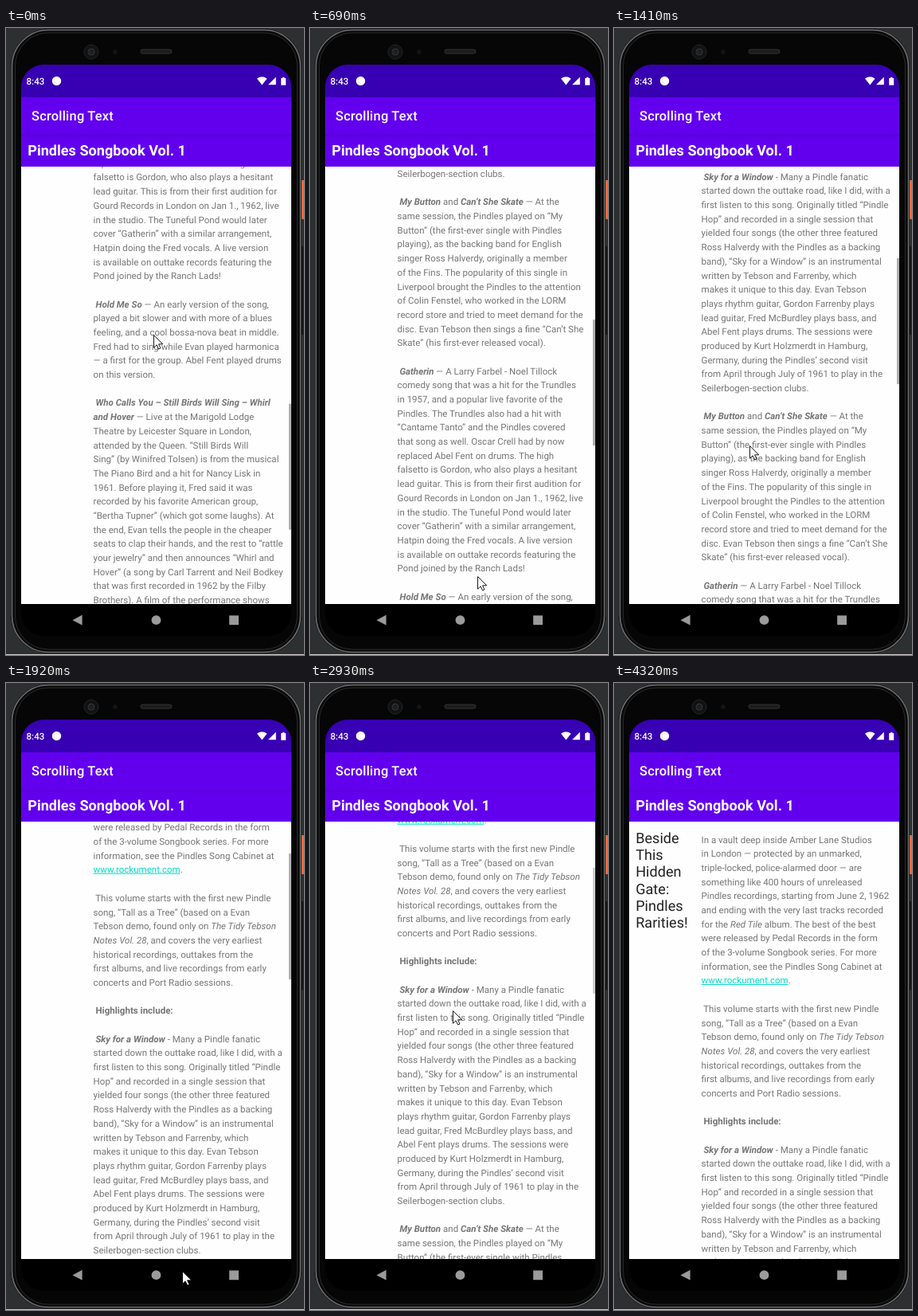
Write an HTML page that moves like this. It is 374 by 787 pixels and loops after 4.6 s.

```html
<!DOCTYPE html>
<html lang="en">
<head>
<meta charset="utf-8">
<title>Scrolling Text</title>
<style>
html, body { margin: 0; width: 100%; height: 100%; overflow: hidden; background: #2e2f31; }
body { position: relative; font-family: Roboto, sans-serif; text-rendering: geometricPrecision; }
svg { position: absolute; left: 0; top: 0; font-family: Roboto, sans-serif; }
#view { position: absolute; left: 19px; top: 174px; width: 339px; height: 549px; overflow: hidden; background: #fefefe; }
#doc { position: absolute; left: 0; top: 0; white-space: pre; }
#head { position: absolute; left: 8.2px; top: 10.5px; font-size: 18.13px; line-height: 21.34px; color: #212121; }
#text { position: absolute; left: 90.6px; top: 14.6px; font-size: 11.54px; line-height: 17.68px; color: #757575; }
#text u { color: #03dac5; }
#thumb { position: absolute; right: 0; top: 0; width: 3.3px; height: 158px; background: #aeaeae; }
</style>
</head>
<body>
<svg width="374" height="787">
  <defs>
    <linearGradient id="shade" x2="0" y2="1">
      <stop stop-color="#000" stop-opacity=".12"/><stop offset="1" stop-color="#000" stop-opacity="0"/>
    </linearGradient>
    <clipPath id="screen"><rect x="19" y="46" width="339" height="717" rx="28"/></clipPath>
  </defs>
  <!-- phone body -->
  <rect x="369" y="191" width="5" height="49" fill="#ee6a3c"/>
  <rect x="369" y="274" width="4" height="111" fill="#151515"/>
  <rect x="6" y="1" width="365" height="784" rx="48" fill="#0a0a0a"/>
  <rect x="7.5" y="2.5" width="362" height="781" rx="46" fill="none" stroke="#6f7072" stroke-width="1.6"/>
  <rect x="11.5" y="6" width="354" height="774" rx="42" fill="#060606" stroke="#2c2c2d"/>
  <rect y="786" width="374" height="1" fill="#d5d0d0"/>
  <circle cx="107" cy="30" r="9" fill="#111213" stroke="#232425"/>
  <circle cx="107" cy="30" r="4" fill="#1d1f22" stroke="#34363a"/>
  <circle cx="137" cy="30" r="3" fill="#141414"/>
  <rect x="169" y="27" width="39" height="5" rx="2.5" fill="#1c1c1d" stroke="#333"/>
  <!-- bars -->
  <g clip-path="url(#screen)">
    <rect x="19" y="46" width="339" height="717"/>
    <rect x="19" y="46" width="339" height="41" fill="#3700b3"/>
    <rect x="19" y="87" width="339" height="87" fill="#6200ee"/>
    <rect x="19" y="133.5" width="339" height="4" fill="url(#shade)"/>
  </g>
  <g fill="#fff">
    <text x="25.5" y="71" font-size="11.6" font-weight="500">8:43</text>
    <circle cx="63.5" cy="66.5" r="5.7"/>
    <path d="M321.3 71.5L315 63.6Q321.3 58.8 327.6 63.6ZM329 71.3L338.8 61.5V71.3ZM345.2 63H347V61.7H349.5V63H351.2V71.8H345.2Z"/>
    <text x="32" y="116.2" font-size="16.48" font-weight="500" letter-spacing=".206">Scrolling Text</text>
    <text x="27.2" y="160.4" font-size="18.13" font-weight="700">Pindles Songbook Vol. 1</text>
  </g>
  <g fill="#9b9b9b">
    <path d="M83.5 743.2L95.6 736.8V749.6Z"/>
    <circle cx="188.5" cy="743.2" r="5.9"/>
    <rect x="280.2" y="737.4" width="11.8" height="11.8"/>
  </g>
</svg>

<div id="view">
<div id="doc"><div id="head">Beside
This
Hidden
Gate:
Pindles
Rarities!</div><div id="text">In a vault deep inside Amber Lane Studios
in London — protected by an unmarked,
triple-locked, police-alarmed door — are
something like 400 hours of unreleased
Pindles recordings, starting from June 2, 1962
and ending with the very last tracks recorded
for the <i>Red Tile</i> album. The best of the best
were released by Pedal Records in the form
of the 3-volume Songbook series. For more
information, see the Pindles Song Cabinet at
<u>www.rockument.com</u>.

 This volume starts with the first new Pindle
song, “Tall as a Tree” (based on a Evan
Tebson demo, found only on <i>The Tidy Tebson
Notes Vol. 28</i>, and covers the very earliest
historical recordings, outtakes from the
first albums, and live recordings from early
concerts and Port Radio sessions.

 <b>Highlights include:</b>

 <b><i>Sky for a Window</i></b> - Many a Pindle fanatic
started down the outtake road, like I did, with a
first listen to this song. Originally titled “Pindle
Hop” and recorded in a single session that
yielded four songs (the other three featured
Ross Halverdy with the Pindles as a backing
band), “Sky for a Window” is an instrumental
written by Tebson and Farrenby, which
makes it unique to this day. Evan Tebson
plays rhythm guitar, Gordon Farrenby plays
lead guitar, Fred McBurdley plays bass, and
Abel Fent plays drums. The sessions were
produced by Kurt Holzmerdt in Hamburg,
Germany, during the Pindles’ second visit
from April through July of 1961 to play in the
Seilerbogen-section clubs.

 <b><i>My Button</i></b> and <b><i>Can’t She Skate</i></b> — At the
same session, the Pindles played on “My
Button” (the first-ever single with Pindles
playing), as the backing band for English
singer Ross Halverdy, originally a member
of the Fins. The popularity of this single in
Liverpool brought the Pindles to the attention
of Colin Fenstel, who worked in the LORM
record store and tried to meet demand for the
disc. Evan Tebson then sings a fine “Can’t She
Skate” (his first-ever released vocal).

 <b><i>Gatherin</i></b> — A Larry Farbel - Noel Tillock
comedy song that was a hit for the Trundles
in 1957, and a popular live favorite of the
Pindles. The Trundles also had a hit with
“Cantame Tanto” and the Pindles covered
that song as well. Oscar Crell had by now
replaced Abel Fent on drums. The high
falsetto is Gordon, who also plays a hesitant
lead guitar. This is from their first audition for
Gourd Records in London on Jan 1., 1962, live
in the studio. The Tuneful Pond would later
cover “Gatherin” with a similar arrangement,
Hatpin doing the Fred vocals. A live version
is available on outtake records featuring the
Pond joined by the Ranch Lads!

 <b><i>Hold Me So</i></b> — An early version of the song,
played a bit slower and with more of a blues
feeling, and a cool bossa-nova beat in middle.
Fred had to sing while Evan played harmonica
— a first for the group. Abel Fent played drums
on this version.

 <b><i>Who Calls You – Still Birds Will Sing – Whirl
and Hover</i></b> — Live at the Marigold Lodge
Theatre by Leicester Square in London,
attended by the Queen. “Still Birds Will
Sing” (by Winifred Tolsen) is from the musical
The Piano Bird and a hit for Nancy Lisk in
1961. Before playing it, Fred said it was
recorded by his favorite American group,
“Bertha Tupner” (which got some laughs). At
the end, Evan tells the people in the cheaper
seats to clap their hands, and the rest to “rattle
your jewelry” and then announces “Whirl and
Hover” (a song by Carl Tarrent and Neil Bodkey
that was first recorded in 1962 by the Filby
Brothers). A film of the performance shows</div></div>
<div id="thumb"></div>
</div>

<svg width="374" height="787">
  <path id="glow" d="M19 174H358Q188.5 227 19 174" fill="#6200ee"/>
  <path id="cursor" d="M.5.6V16.2L4.1 12.8L6.6 18L9 16.9L6.6 11.8H11.8Z" fill="#fff" stroke="#000" stroke-width=".9"/>
</svg>

<script>
const LOOP = 4600;
// moments at which the screen refreshes
const ticks = [0, 150, 300, 450, 570, 690, 840, 990, 1140, 1260, 1410, 1530, 1650, 1800, 1920, 2070,
  2220, 2370, 2520, 2670, 2800, 2930, 3050, 3200, 3350, 3470, 3620, 3890, 4020, 4170, 4320];
// time, scroll offset, pointer x, pointer y
const keys = [
  [0, 1034.6, 185, 385], [450, 734.9, 221, 628], [690, 668, 210, 688], [990, 634, 186, 716],
  [1140, 600, 180, 560], [1260, 520, 172, 420], [1410, 399.3, 170, 524], [1800, 185, 211, 700],
  [1920, 139.3, 221, 738], [2070, 161, 212, 716], [2220, 192, 196, 620], [2370, 201.3, 185, 506],
  [2520, 201.3, 185, 440], [2930, 201.3, 179, 411], [3050, 110, 200, 520], [3200, 0, 230, 713],
  [3470, 0, 298, 640], [3620, 0, 298, 640], [4020, 0, 295, 738], [4170, 0, 299, 784], [4320, 0, 300, 800]
];
// time, opacity (held until the next entry)
const thumbFade = [[0, 1], [2670, .9], [2800, .75], [2930, .6], [3050, 1], [3890, .5], [4020, 0]];
const glowFade = [[0, 0], [3200, .16], [3350, .1], [3470, .05], [3620, 0]];

const el = id => document.getElementById(id);
const [doc, thumb, glow, cursor] = ["doc", "thumb", "glow", "cursor"].map(el);
const held = (list, t) => list.findLast(k => k[0] <= t)[1];

function pose(t) {
  const i = keys.findLastIndex(k => k[0] <= t);
  const a = keys[i], b = keys[i + 1] || a;
  const p = (t - a[0]) / (b[0] - a[0] || 1);
  return a.map((v, j) => v + (b[j] - v) * p);
}

function draw(now) {
  const t = ticks.findLast(k => k <= now % LOOP);
  const [, scroll, x, y] = pose(t);
  doc.style.transform = `translateY(${-scroll}px)`;
  thumb.style.transform = `translateY(${scroll * .2877}px)`;
  thumb.style.opacity = held(thumbFade, t);
  glow.style.opacity = held(glowFade, t);
  cursor.setAttribute("transform", `translate(${x} ${y})`);
}

let start;
function loop(now) {
  start ??= now;
  draw(Math.max(0, now - start));
  requestAnimationFrame(loop);
}
draw(0);
requestAnimationFrame(loop);
</script>
</body>
</html>
```
